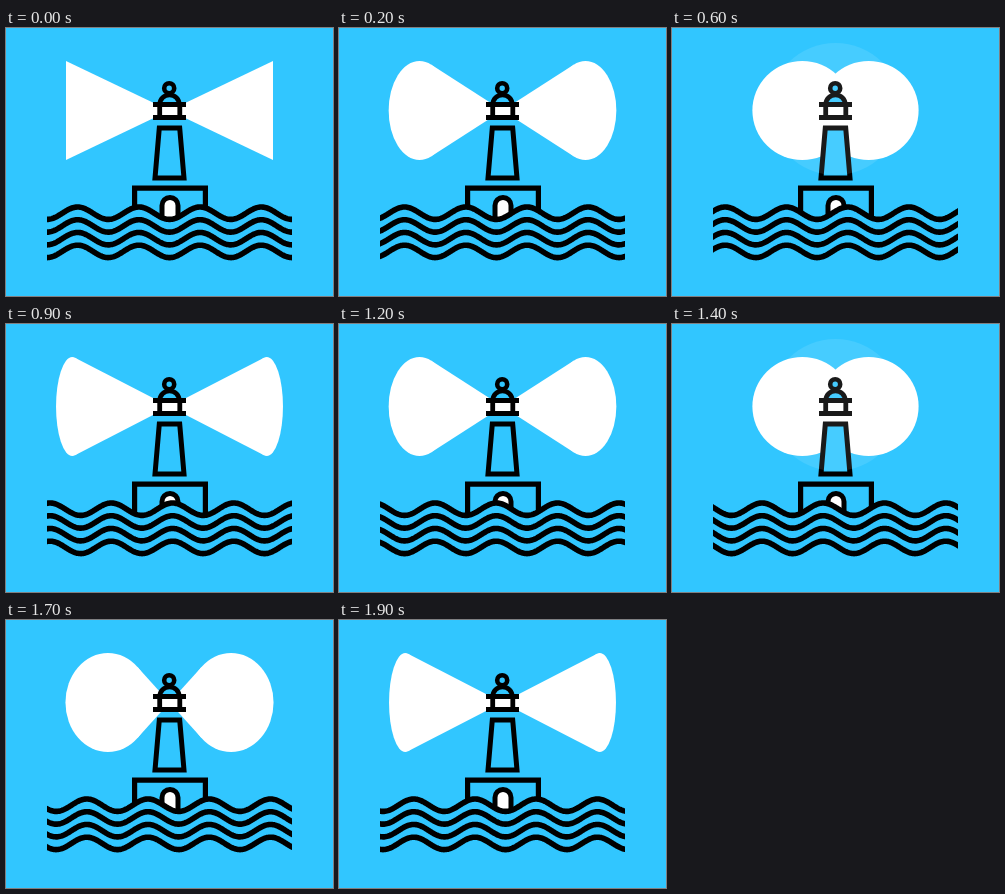
Recreate the animation shown at these times as an HTML page with a canvas. Size 327 by 268 pixels, loop 2 s.

```html
<!DOCTYPE html>
<html lang="en">
<head>
<meta charset="utf-8">
<title>Lighthouse</title>
<style>
  html, body { margin: 0; width: 100%; height: 100%; overflow: hidden; background: #31c6ff; }
  canvas { display: block; width: 327px; height: 268px; }
</style>
</head>
<body>
<canvas id="stage"></canvas>
<script>
const W = 327, H = 268, LOOP = 2000, STEP = 100;
const SKY = '#31c6ff', INK = '#000', LIGHT = '#fff';
const LAMP = { x: 163.5, y: 82.5 };
const SEA = { left: 41, right: 286, mid: 185.2, amp: 6.2, gap: 12.73, lines: 4 };
const WAVE = (SEA.right - SEA.left) / 4;

const canvas = document.getElementById('stage');
const ratio = window.devicePixelRatio || 1;
canvas.width = Math.round(W * ratio);
canvas.height = Math.round(H * ratio);
const ctx = canvas.getContext('2d');
ctx.scale(ratio, ratio);

function paint(fill, width) {
  if (fill) {
    ctx.fillStyle = fill;
    ctx.fill();
  }
  if (width) {
    ctx.strokeStyle = INK;
    ctx.lineWidth = width;
    ctx.stroke();
  }
}

function poly(points, fill, width, closed = true) {
  ctx.beginPath();
  points.forEach(([x, y]) => ctx.lineTo(x, y));
  if (closed) ctx.closePath();
  paint(fill, width);
}

function disc(x, y, r, fill, width) {
  ctx.beginPath();
  ctx.arc(x, y, r, 0, Math.PI * 2);
  paint(fill, width);
}

// Two opposite cones with round ends, making half a turn per second.
function drawBeams(angle) {
  const s = Math.abs(Math.sin(angle)), c = Math.abs(Math.cos(angle));
  const a = Math.atan2(s, c);
  const reach = 103.5 * c - 1.25 * Math.sin(4 * a);
  const rx = 52.5 * s, ry = 49.5;
  for (const side of [-1, 1]) {
    const x = LAMP.x + side * reach;
    ctx.beginPath();
    ctx.ellipse(x, LAMP.y, rx, ry, 0, 0, Math.PI * 2);
    paint(LIGHT);
    if (reach > rx) {
      const k = rx / reach;
      const tx = x - side * rx * k, ty = ry * Math.sqrt(1 - k * k);
      poly([[LAMP.x, LAMP.y], [tx, LAMP.y - ty], [tx, LAMP.y + ty]], LIGHT);
    }
  }
}

function drawTower() {
  poly([[153.3, 100], [173.7, 100], [178, 150], [149, 150]], SKY, 5);

  ctx.beginPath();
  ctx.arc(163.5, 76.5, 9.7, Math.PI, 0);
  paint(SKY, 4.8);
  disc(163.2, 60.2, 5, SKY, 4.6);

  poly([[153.7, 76.5], [173.8, 76.5], [173.8, 89.5], [153.7, 89.5]], LIGHT, 4.8);
  for (const y of [76.5, 89.5]) poly([[147, y], [180, y]], null, 5, false);
}

function drawBase() {
  poly([[128.6, 198], [128.6, 160.2], [199.4, 160.2], [199.4, 198]], SKY, 5.2, false);
  ctx.beginPath();
  ctx.moveTo(156, 198);
  ctx.lineTo(156, 177.5);
  ctx.arc(164, 177.5, 8, Math.PI, 0);
  ctx.lineTo(172, 198);
  paint(LIGHT, 5);
}

function wavePoints(mid, shift) {
  const points = [];
  for (let x = SEA.left - 4; x <= SEA.right + 4; x++) {
    const phase = (x - SEA.left + shift) / WAVE * Math.PI * 2;
    points.push([x, mid + SEA.amp * Math.cos(phase)]);
  }
  return points;
}

function drawSea(shift) {
  ctx.save();
  ctx.beginPath();
  ctx.rect(SEA.left, 0, SEA.right - SEA.left, H);
  ctx.clip();
  const surface = wavePoints(SEA.mid, shift);
  poly([...surface, [SEA.right + 4, H], [SEA.left - 4, H]], SKY);
  for (let i = 0; i < SEA.lines; i++) {
    poly(wavePoints(SEA.mid + i * SEA.gap, shift), null, 5.6, false);
  }
  ctx.restore();
}

// A soft flash while a beam faces the viewer.
function drawGlow(turn) {
  const alpha = 0.2 * Math.max(0, 1 - Math.abs(turn - 0.5) / 0.2);
  if (alpha > 0.001) disc(163.5, 81, 66, `rgba(255,255,255,${alpha})`);
}

function draw(time) {
  const t = Math.floor(time % LOOP / STEP) * STEP;
  const turn = t % 1000 / 1000;
  ctx.fillStyle = SKY;
  ctx.fillRect(0, 0, W, H);
  drawBeams(turn * Math.PI);
  drawTower();
  drawGlow(turn);
  drawBase();
  drawSea(t / LOOP * WAVE);
}

const start = performance.now();
function tick() {
  draw(performance.now() - start);
  requestAnimationFrame(tick);
}
tick();
</script>
</body>
</html>
```
